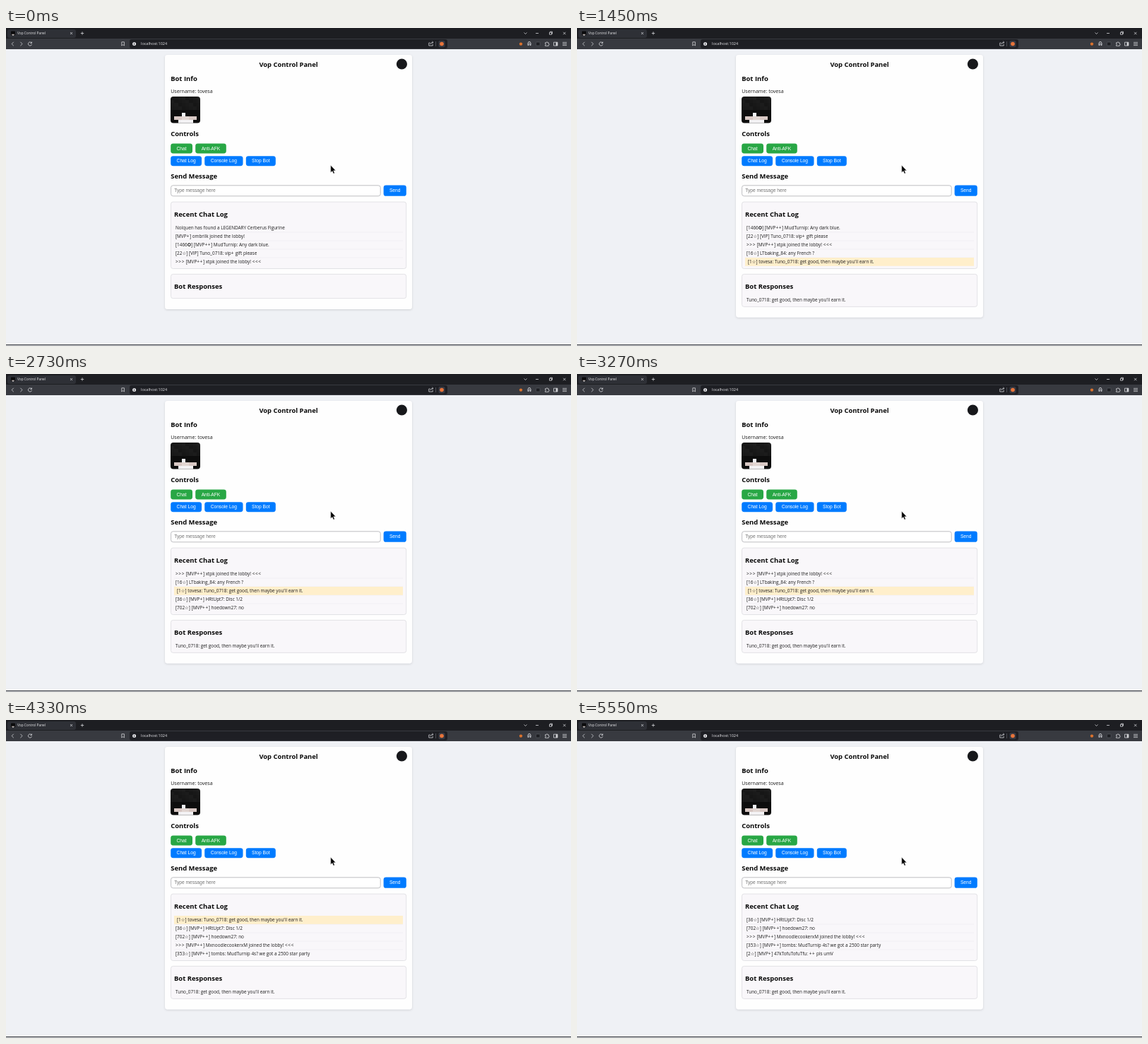
Write an HTML page that moves like this. It is 800 px wide and 450 px high and loops after 5580 ms.

```html
<!DOCTYPE html>
<html lang="en">
<head>
<meta charset="utf-8">
<title>Vop Control Panel</title>
<style>
  html, body { margin: 0; width: 100%; height: 100%; overflow: hidden; background: #eff1f5; }
  svg { display: block; width: 800px; height: 450px; }
  text { font-family: "Open Sans", "Noto Sans", "DejaVu Sans", sans-serif; white-space: pre; }
  .h { font-size: 9.45px; font-weight: 700; fill: #080808; }
  .title { font-size: 9.35px; text-anchor: middle; }
  .user { font-size: 7.08px; fill: #1c1c1c; }
  .chat { font-size: 6.4px; fill: #1c1c1c; }
  .sign { letter-spacing: .11em; }
  .btn, .hint { font-family: "Liberation Sans", Arial, sans-serif; font-size: 6.67px; }
  .btn { fill: #fff; text-anchor: middle; }
  .hint { fill: #757575; }
  .tab { font-size: 4.8px; fill: #e8e8ea; }
  .url { font-size: 5.5px; fill: #e4e4e8; }
  .icon { fill: none; stroke: #d4d5d9; stroke-width: .8; }
  .box { fill: #f9f7fa; stroke: #dcdce0; stroke-width: .8; }
</style>
</head>
<body>
<svg id="stage" viewBox="0 0 800 450" xmlns="http://www.w3.org/2000/svg">
  <defs>
    <filter id="shadow" x="-5%" y="-5%" width="110%" height="110%">
      <feDropShadow dx="0" dy="1" stdDeviation="1.6" flood-color="#000" flood-opacity=".14"/>
    </filter>
    <clipPath id="round"><rect x="233" y="97" width="42" height="37.5" rx="4"/></clipPath>
  </defs>
</svg>
<script>
const LOOP = 5580;
const ROW = 12;
const VISIBLE = 5;

// Moments at which the log advances by one line
const advances = [310, 670, 1460, 2640, 3380, 4030, 5400];

const reply = "Tuno_0718: get good, then maybe you'll earn it.";
const own = 6;
const messages = [
  "Nolquen has found a LEGENDARY Cerberus Figurine",
  "[MVP+] ombrilk joined the lobby!",
  "[1466✪] [MVP++] MudTurnip: Any dark blue.",
  "[22☆] [VIP] Tuno_0718: vip+ gift please",
  ">>> [MVP++] xtpk joined the lobby! <<<",
  "[16☆] LTbaking_84: any French ?",
  "[1☆] tovesa: " + reply,
  "[36☆] [MVP+] HRtUpt7: Disc 1/2",
  "[702☆] [MVP++] hoedown27: no",
  ">>> [MVP++] MxnoodlecookerxM joined the lobby! <<<",
  "[353☆] [MVP++] tombs: MudTurnip 4s? we got a 2500 star party",
  "[2☆] [MVP+] 47kTofuTofuTfu: ++ pls umV"
];

const stage = document.getElementById("stage");

function add(tag, attrs, parent = stage) {
  const el = document.createElementNS(stage.namespaceURI, tag);
  for (const key in attrs) el.setAttribute(key, attrs[key]);
  return parent.appendChild(el);
}
function rect(x, y, width, height, attrs, parent) {
  return add("rect", { x, y, width, height, ...attrs }, parent);
}
function dot(cx, cy, r, fill) {
  return add("circle", { cx, cy, r, fill });
}
function text(x, y, kind, value) {
  const el = add("text", { x, y, class: kind });
  el.textContent = value;
  return el;
}
function icon(d, attrs) {
  return add("path", { d, class: "icon", ...attrs });
}
function button(x, y, w, h, fill, label) {
  rect(x, y, w, h, { rx: 3.4, fill });
  text(x + w / 2, y + h / 2 + 2.1, "btn", label);
}

// Plus signs and angle brackets are set a little wider
function setMessage(line, message) {
  line.textContent = "";
  for (const part of message.split(/([+<>]+)/)) {
    const span = add("tspan", /^[+<>]/.test(part) ? { class: "sign" } : {}, line);
    span.textContent = part;
  }
}

function drawBrowser() {
  rect(0, 0, 800, 15, { fill: "#1d1e22" });
  rect(0, 15, 800, 15, { fill: "#383a40" });
  add("path", { d: "M2 14V5q0-3 3-3H96q3 0 3 3V11q0 3-3 3H5q-3 0-3-3Z", fill: "#2e3036" });
  rect(7, 4.5, 6, 6, { rx: .8, fill: "#0b0b0c" });
  rect(8, 8.8, 4, .8, { fill: "#d8c8c4" });
  rect(8.8, 9.6, 2.4, .9, { fill: "#f4f4f4" });
  text(16, 9.3, "tab", "Vop Control Panel");
  icon("M91 6l3 3M94 6l-3 3M105.8 7.5h4.4M108 5.3v4.4");
  icon("M733.5 6.5l2 2 2-2M750 7.5h4M789 5.8l3.4 3.4M792.4 5.8l-3.4 3.4");
  icon("M769.5 6.2h3v3h-3ZM770.5 6.2v-1h3v3h-1", { "stroke-width": .7 });

  icon("M10.8 19.8l-2.7 2.7 2.7 2.7");
  icon("M20.4 19.8l2.7 2.7-2.7 2.7", { stroke: "#85878e" });
  icon("M36 20.8a2.6 2.6 0 1 0 .5 2.4M36.5 19.5v2h-2");
  icon("M163.8 19.8h3.6v5.2l-1.8-1.4-1.8 1.4Z");
  rect(175, 16, 450, 13, { rx: 3, fill: "#1e1f24" });
  dot(181.6, 22.5, 2.5, "#e4e4e8");
  rect(181.2, 21.9, .8, 2, { fill: "#1e1f24" });
  rect(181.2, 20.8, .8, .7, { fill: "#1e1f24" });
  text(191, 24.4, "url", "localhost:1024");
  icon("M600.5 21h-1.7v4h5.4v-2M600.8 23q.4-2.6 4-2.6M603.4 18.9l1.6 1.5-1.6 1.5", { "stroke-width": .7 });
  rect(608.3, 19, .6, 7, { fill: "#6a6c74" });
  rect(612.5, 17.8, 9, 9.4, { rx: 2, fill: "#373942" });
  dot(617, 22.5, 2.8, "#e8743b");
  dot(729, 22.6, 2.2, "#d9722e");
  icon("M738 22h6M739.3 21.5l.6-2h2.2l.6 2");
  dot(739.5, 23.8, 1.1, "#c9cad0");
  dot(742.5, 23.8, 1.1, "#c9cad0");
  rect(750.4, 20, 5.6, 5, { rx: .6, fill: "#1d1e22", stroke: "#666870", "stroke-width": .5 });
  icon("M763.5 20.8h1.5a1 1 0 0 1 2 0h1.2v1.5a1 1 0 0 1 0 2v1h-4.7v-1.3a.8.8 0 0 0 0-1.8Z");
  icon("M775.5 20.2h5.4v4.8h-5.4Z");
  rect(778.6, 20.2, 2.3, 4.8, { fill: "#d4d5d9" });
  icon("M788 20.4h6M788 22.5h6M788 24.6h6");
}

function drawAvatar() {
  const g = add("g", { "clip-path": "url(#round)", "shape-rendering": "crispEdges" });
  const w = 42 / 8, h = 37.5 / 8;
  const block = (col, row, span, fill) => rect(233 + col * w, 97 + row * h, span * w, h, { fill }, g);
  for (let row = 0; row < 8; row++) {
    for (let col = 0; col < 8; col++) {
      const shade = row > 3 ? 13 : 22 + (col * 5 + row * 3) % 4 * 2;
      block(col, row, 1, `rgb(${shade},${shade},${shade})`);
    }
  }
  block(3, 5, 1, "#eef0f3");
  block(1, 6, 6, "#d8c8c4");
  block(3, 6, 2, "#e2d6d2");
  block(2, 7, 4, "#f3f2f4");
}

drawBrowser();
const card = rect(225, 38, 350, 360, { rx: 4, fill: "#fefefe", filter: "url(#shadow)" });
text(400, 55.3, "h title", "Vop Control Panel");
dot(560.4, 51, 7.6, "#17181b");
text(233.2, 75, "h", "Bot Info");
text(233.2, 91.6, "user", "Username: tovesa");
drawAvatar();

text(233.2, 153.4, "h", "Controls");
const green = "#28a745", blue = "#007bff";
button(233.2, 163.4, 30.8, 14, green, "Chat");
button(268.2, 163.4, 43.6, 14, green, "Anti-AFK");
button(233.2, 181.2, 43.8, 14, blue, "Chat Log");
button(281.2, 181.2, 54.3, 14, blue, "Console Log");
button(339.8, 181.2, 42, 14, blue, "Stop Bot");

text(233.2, 212.9, "h", "Send Message");
rect(233.6, 222.8, 296.6, 15, { rx: 3, fill: "#fff", stroke: "#aeafb3", "stroke-width": .8 });
text(238.2, 232.3, "hint", "Type message here");
button(534.6, 222.4, 32.2, 15.4, blue, "Send");

rect(233.5, 246.1, 333.2, 94.4, { rx: 3, class: "box" });
text(238, 267.3, "h", "Recent Chat Log");
for (let i = 1; i < VISIBLE; i++) {
  rect(238, 276.7 + i * ROW, 324, .6, { fill: "#ebe9ed" });
}
const mark = rect(238, 277, 324, 11.8, { fill: "#ffefcb" });
const lines = Array.from({ length: VISIBLE }, (_, i) => text(240, 285.2 + i * ROW, "chat", ""));

const answers = rect(233.5, 348.4, 333.2, 34.2, { rx: 3, class: "box" });
text(238, 369.3, "h", "Bot Responses");
const answer = text(240, 387.2, "chat", reply);

add("path", {
  d: "M459.7 194.3v10.2l2.3-2.1 1.6 3.7 1.7-.7-1.6-3.6h3.1Z",
  fill: "#050505", stroke: "#fff", "stroke-width": .4
});
rect(0, 448, 800, 1, { fill: "#1d1e22" });

let shown = -1;
function show(first) {
  if (first === shown) return;
  shown = first;
  lines.forEach((line, i) => {
    const index = first + i;
    setMessage(line, messages[index]);
    line.setAttribute("x", index === own ? 242 : 240);
  });
  const place = own - first;
  const marked = place >= 0 && place < VISIBLE;
  mark.setAttribute("visibility", marked ? "visible" : "hidden");
  mark.setAttribute("y", 277 + place * ROW);

  const answered = first + VISIBLE > own;
  answer.setAttribute("visibility", answered ? "visible" : "hidden");
  answers.setAttribute("height", answered ? 46 : 34.2);
  card.setAttribute("height", answered ? 371.5 : 360);
}

const start = performance.now();
function tick() {
  const t = (performance.now() - start) % LOOP;
  show(advances.filter(at => t >= at).length);
  requestAnimationFrame(tick);
}
tick();
</script>
</body>
</html>
```
